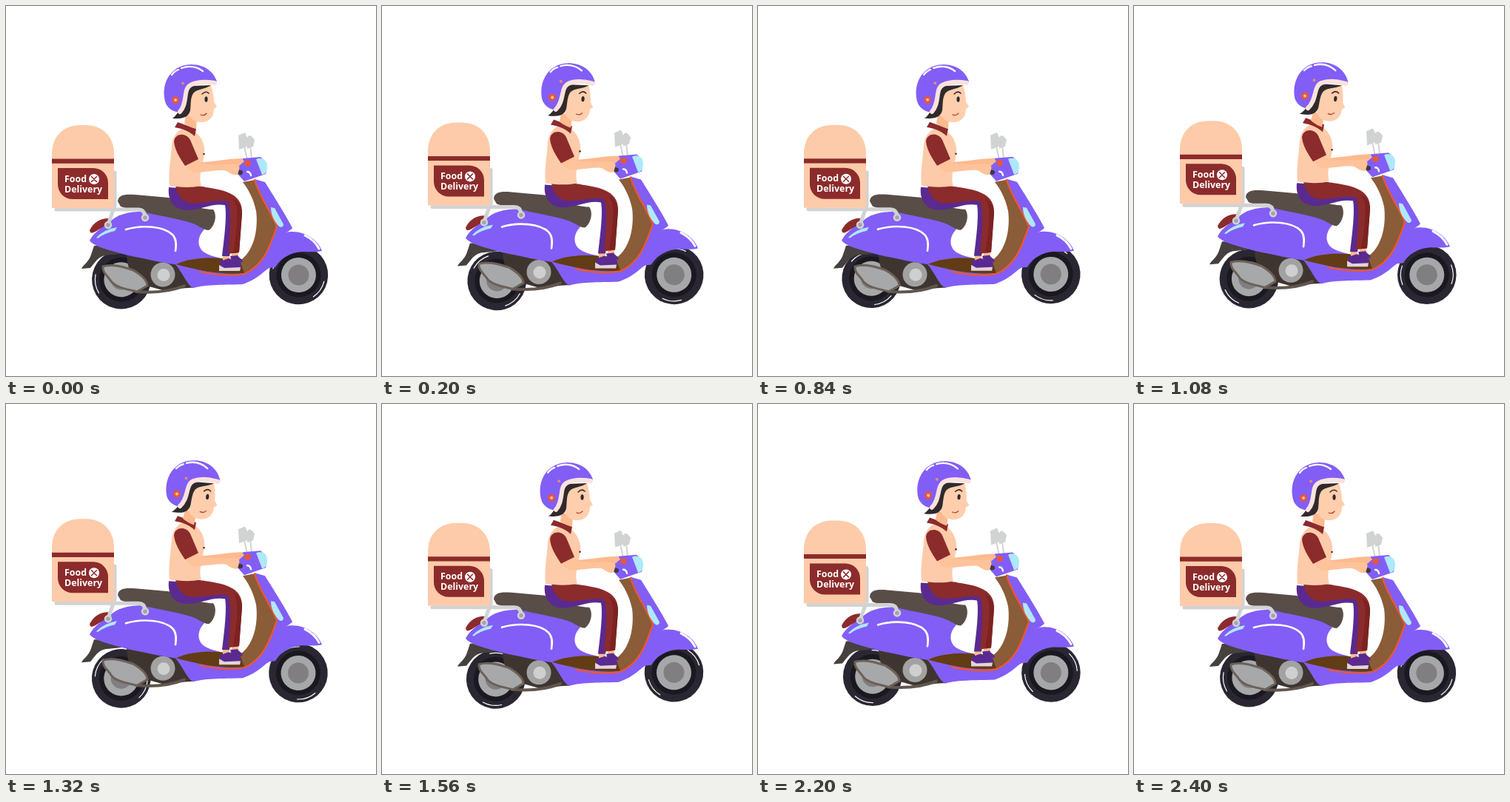
Recreate the animation shown at these times as an HTML page. Size 500 px wide and 500 px high, loop 2.44 s.

```html
<!DOCTYPE html>
<html lang="en">
<head>
<meta charset="utf-8">
<title>Food delivery scooter</title>
<style>
  html, body { margin: 0; width: 100%; height: 100%; overflow: hidden; background: #fff; }
  svg { display: block; width: 100vw; height: 100vh; }
  text { font: bold 12.4px "Noto Sans", "Open Sans", sans-serif; fill: #fff; }
  .purple { fill: #825ef6; }
  .maroon { fill: #8c2b2b; }
  .violet { fill: #5a2a91; }
  .peach { fill: #fdcba9; }
  .skin { fill: #fdba8f; }
  .ice { fill: #aee8fc; }
  .dark { fill: #3f3530; }
  .orange { fill: #f0562c; }
  .metal { fill: #d1d3d3; }
  .line { fill: none; stroke-linecap: round; stroke-linejoin: round; }
  .shine { stroke: #fff; }
  .rail { stroke: #d1d3d3; stroke-width: 5; }
</style>
</head>
<body>
<svg viewBox="0 0 500 500">
  <defs>
    <g id="wheel">
      <circle r="39.8" fill="#2a2732"/>
      <circle r="30" fill="#1a1820"/>
      <circle r="23.5" fill="#a6a7a9"/>
      <circle r="14" fill="#807e80"/>
      <circle class="line shine" r="35.5" pathLength="360" stroke-width="1.2" stroke-dasharray="42 138"/>
    </g>
  </defs>
  <g id="rear"><use href="#wheel" transform="translate(1.9 -.3) rotate(-31)"/></g>
  <g id="front"><use href="#wheel" transform="translate(.2 .7) rotate(14)"/></g>

  <g id="scooter">
    <!-- engine and tail -->
    <path d="M119 324L132 324 164 334 134 337C124 339 121 346 114 354L102 355C104 350 112 346 115 336Z" fill="#46403f"/>
    <path class="dark" d="M163 333C190 341 215 346 232 348L254 381C240 380 232 384 215 385L190 378C170 367 163 355 163 333Z"/>
    <path class="line" d="M176 386C200 388 222 386 241 378" stroke="#61564d" stroke-width="4"/>
    <circle cx="212" cy="363" r="16.5" fill="#a2a2a2"/>
    <circle cx="213" cy="363.5" r="8.5" fill="#cfcfcf"/>
    <path d="M131 352C145 348 160 353 172 357 182 363 191 370 191 378L177 386C160 382 148 380 142 372 138 365 130 361 131 352Z" fill="#a7a8aa" stroke="#6c6157" stroke-width="3"/>

    <!-- bodywork -->
    <path class="purple" d="M228 348C240 362 245 378 253 381 270 376 300 377 320 376 345 367 350 355 360 352L371 312C378 306 385 303 387 300 380 286 365 262 350 238L336 234 355 290C350 335 335 350 318 356Z"/>
    <path class="maroon" d="M113 303C119 291 129 286 141 287L134 299C124 300 119 309 114 306Z"/>
    <path class="purple" d="M113 317C118 307 128 300 138 294 150 280 170 277 195 278 230 282 262 292 268 302 258 312 258 326 268 333 278 339 290 340 292 342L234 350C215 348 190 342 165 337 140 330 120 326 113 317Z"/>
    <path d="M320 238L336 235C341 255 358 278 366 297 358 320 350 350 322 361 295 364 262 358 230 349 250 340 275 340 290 341L319 342C336 328 341 300 338 277 334 258 326 246 320 238Z" fill="#8a5c38"/>
    <path d="M230 349C250 340 275 340 290 341L318 350 322 361C295 364 262 358 230 349Z" fill="#613c14"/>
    <path class="line" d="M336 235C341 255 358 278 366 298 358 320 350 350 322 362 300 366 280 363 262 359" stroke="#f0562c" stroke-width="2.2"/>
    <path class="ice" d="M358 272L363 273 375 295C375 299 371 300 368 297 362 290 358 282 358 272Z"/>
    <path class="purple" d="M355 354C355 330 368 305 385 305 405 304 422 317 427 331 420 333 410 332 400 332 384 333 371 341 364 353Z"/>
    <path class="line shine" d="M404 310C412 314 419 320 423 328" stroke-width="3"/>
    <path class="line shine" d="M162 302C185 295 214 298 225 309 231 315 230 324 229 331" stroke-width="2.6"/>
    <path class="ice" d="M122 313Q132 302 150 299L147 304Q133 307 124 314Z"/>
    <path d="M151 264C152 255 160 254 175 255L220 259C235 267 268 275 280 275 286 283 282 298 274 303 267 303 262 297 250 293 220 284 180 279 155 271Z" fill="#594d47"/>

    <!-- steering head -->
    <path class="metal" d="M314 175L323 171 326 178 326 190 315 194ZM326 178Q329 171 336 181L334 190 326 193Z"/>
    <path class="line" d="M322 190L326 208M330 189L332 206" stroke="#d1d3d3" stroke-width="2"/>
    <path class="purple" d="M312 216L320 206 344 204C351 209 353 219 351 227L322 237 314 228Z"/>
    <path class="ice" d="M338 207C347 203 353 209 353 217 353 224 350 228 346 228Z"/>
    <path class="line shine" d="M326 224Q330 224 331 229" stroke-width="2.4"/>
    <circle class="orange" cx="326.500" cy="212.500" r="4"/>

    <!-- legs -->
    <path class="skin" d="M305 332H314V339H305ZM293 336H302L301 345H293Z"/>
    <path class="violet" d="M303 338L313 337C315 341 319 341 320 346L306 348ZM289 345L301 341C306 346 314 345 318 348L317 356H289Z"/>
    <path d="M288 350L295 354 317 353 316 358H288Z" fill="#e2d5da"/>
    <path class="violet" d="M220 245C218 264 228 276 246 276 265 275 278 266 296 269 299 285 294 320 292 338H302L311 270 290 250Z"/>
    <path class="maroon" d="M229 243C245 242 262 243 270 245 300 249 320 256 319 280L315 333 300 335C303 310 306 270 299 264 285 261 262 269 246 266 236 262 231 254 229 243Z"/>
    <path d="M306 260C317 270 312 302 307 334L315 333 319 280C319 271 314 264 306 260Z" fill="#7c2222"/>

    <!-- torso and arms -->
    <path class="peach" d="M224 188C226 172 236 164 246 165L257 171C268 180 270 195 267 206 262 225 261 235 264 243 250 246 234 245 221 243 219 225 223 205 224 188Z"/>
    <path class="maroon" d="M232 157L257 166 255 176C246 168 238 166 228 164Z"/>
    <circle class="dark" cx="267.500" cy="200" r="1.300"/>
    <path class="skin" d="M256 211C275 212 300 206 319 206L322 210 314 217 262 220Z"/>
    <path class="line" d="M305 222L317 225" stroke="#40393c" stroke-width="6"/>
    <path d="M243 214L259 207C261 213 268 215 304 214 313 213 317 216 315 221L313 228C304 230 302 223 294 222 282 222 270 224 260 225 251 226 245 221 243 214Z" fill="#ffc39b"/>
    <path class="maroon" d="M227 183C228 172 243 170 249 181L260 207 242 216C235 205 228 195 227 183Z"/>

    <!-- luggage rack and box -->
    <path class="line rail" d="M147 225V270L138 295M68 275H179Q187 275 188 284"/>
    <g fill="#a3a5a6" stroke="#d1d3d3" stroke-width="2.500">
      <circle cx="138" cy="296" r="4"/>
      <circle cx="188" cy="286" r="4"/>
    </g>
    <path class="peach" d="M62 273V200C62 176 78 161 100 161H108C130 161 146 176 146 200V273Z"/>
    <path class="maroon" d="M62 206.500H146V212.700H62ZM70 219H118A20 20 0 0 1 138 239V261H90A20 20 0 0 1 70 241Z"/>
    <text x="79" y="237.500">Food</text>
    <text x="79" y="251.500">Delivery</text>
    <circle cx="119" cy="234" r="7" fill="#fff"/>
    <path class="line" d="M115.500 230.500L122.500 237.500M122.500 230.500L115.500 237.500" stroke="#8c2b2b" stroke-width="1.500"/>
  </g>

  <g id="head">
    <path class="skin" d="M243 146L258 152 257 166Q248 164 241 159Z"/>
    <path d="M249 112L277 107C280 117 281 125 281 130L285 136 281 139C281 152 272 158 262 157 252 156 246 150 247 140Z" fill="#ffcead"/>
    <path d="M225 152C234 146 238 130 243 116L252 108 277 107C268 113 258 112 253 118 249 124 250 133 249 141 247 148 243 153 225 152Z" fill="#302a2c"/>
    <ellipse cx="270.500" cy="126" rx="2.100" ry="3.700" fill="#302a2c"/>
    <path class="line" d="M265 119Q270 114 274 118" stroke="#302a2c" stroke-width="1.600"/>
    <path class="line" d="M263 147Q268 149 271 145" stroke="#b5432f" stroke-width="1.300"/>
    <path class="purple" d="M216 132C208 108 220 80 250 79 270 79 281 90 285 102 275 100 262 99 250 105 240 109 243 130 235 144 227 143 220 140 216 132Z"/>
    <path class="line" d="M282 104C270 102 258 102 249 107 239 113 246 131 235 143" stroke="#fbe2dc" stroke-width="6"/>
    <path class="line shine" d="M224 93C227 89 230 87 233 86M237 84C248 80 258 82 266 88" stroke-width="2.300"/>
    <circle class="orange" cx="229" cy="127" r="4.800"/>
    <circle cx="229" cy="127" r="2" fill="#fbc3a0"/>
    <circle cx="239" cy="104.500" r="2" fill="#e08a78"/>
  </g>
</svg>
<script>
  const LOOP = 2440, STEP = 40, BOUNCE = 800, SPIN = 1200;
  const place = (id, transform) => document.getElementById(id).setAttribute("transform", transform);

  function draw() {
    const t = Math.floor(performance.now() % LOOP / STEP) * STEP;
    const lift = (1 - Math.cos(2 * Math.PI * t / BOUNCE)) / 2;
    const turn = 360 * t / SPIN;
    place("rear", `translate(154 370) rotate(${turn})`);
    place("front", `translate(395.2 362.8) rotate(${turn})`);
    place("scooter", `translate(0 ${-7.2 * lift})`);
    place("head", `rotate(${8.6 * lift} 276 140)`);
    requestAnimationFrame(draw);
  }
  draw();
</script>
</body>
</html>
```
